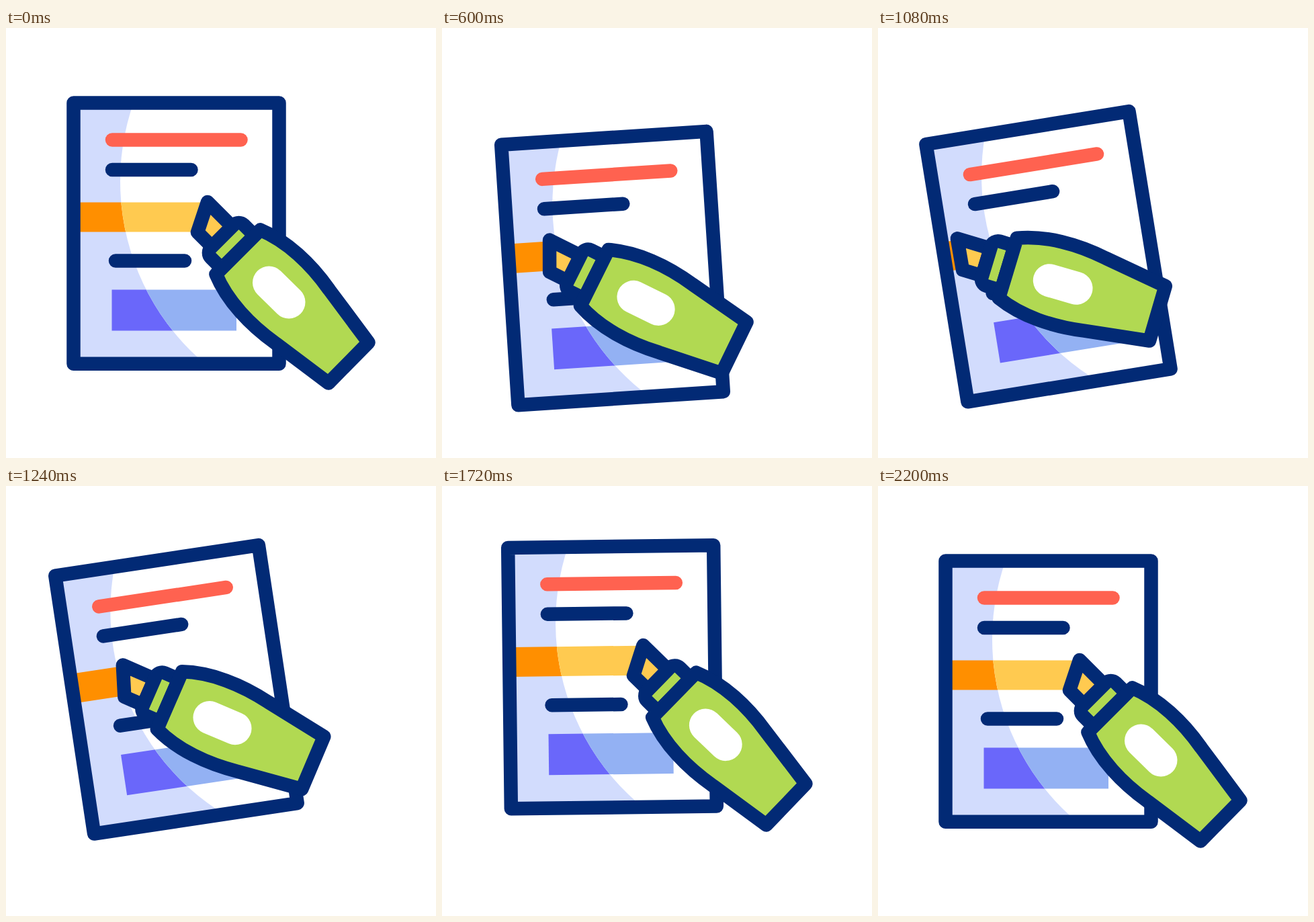
Recreate the animation shown at these times as an HTML page. Size 640 by 640 pixels, loop 2400 ms.

```html
<!DOCTYPE html>
<html lang="en">
<head>
<meta charset="utf-8">
<title>Highlighter</title>
<style>
  html, body { margin: 0; width: 100%; height: 100%; overflow: hidden; background: #fff; }
  svg { display: block; width: 100%; height: 100%; }
  .ink { stroke: #022a75; stroke-width: 20.5; stroke-linecap: round; stroke-linejoin: round; }
</style>
</head>
<body>
<svg viewBox="0 0 640 640">
  <clipPath id="lit"><circle cx="526" cy="228" r="356"/></clipPath>
  <g id="page">
    <path fill="#d2dcfd" d="M100.5 111.5h306v388.3h-306z"/>
    <rect class="mark" x="105" y="259.5" height="44" fill="#ff8f00"/>
    <path fill="#6a67fa" d="M157.5 389.5H343v61H157.5z"/>
    <g clip-path="url(#lit)">
      <path fill="#fff" d="M100.5 111.5h306v388.3h-306z"/>
      <rect class="mark" x="105" y="259.5" height="44" fill="#ffca50"/>
      <path fill="#93b1f3" d="M157.5 389.5H343v61H157.5z"/>
    </g>
    <path class="ink" style="stroke:#ff6250" d="M158 166.5H349.5"/>
    <path class="ink" fill="none" d="M158 211H275.500M163 346.500H266M100.500 111.500h306v388.300h-306z"/>
    <g id="pen" class="ink">
      <path fill="#ffca50" d="M300 259L336.500 295.500L306.500 325.500L285 304Z"/>
      <path fill="#b1d952" d="M339 293A10.600 10.600 0 0 1 354 293L370 309L321 358L305 342A10.600 10.600 0 0 1 305 327Z"/>
      <path fill="#b1d952" d="M378.500 300.500C418 317 454 351 481 389.500L539.500 468L480 528.500L401.500 469.500C363 442 329 406 312.500 366.500Z"/>
      <path style="stroke:#fff;stroke-width:49" d="M391.500 379L421 408"/>
    </g>
  </g>
</svg>
<script>
const LOOP = 2400, STEP = 40;
const page = document.getElementById('page');
const pen = document.getElementById('pen');
const marks = document.querySelectorAll('.mark');

// Cubic Bezier easing with handles (a, 0) and (b, 1)
function ease(x, a, b) {
  let lo = 0, hi = 1;
  for (let i = 0; i < 24; i++) {
    const s = (lo + hi) / 2, r = 1 - s;
    if (3 * a * s * r * r + 3 * b * s * s * r + s * s * s < x) lo = s; else hi = s;
  }
  return lo * lo * (3 - 2 * lo);
}

// Keys: [time, value, a, b], the handles shape the move that ends at the key
function track(keys, t) {
  const i = keys.findIndex(k => t < k[0]);
  if (i < 0) return keys[keys.length - 1][1];
  if (i === 0) return keys[0][1];
  const [t0, v0] = keys[i - 1], [t1, v1, a = 1 / 3, b = 2 / 3] = keys[i];
  return v0 + (v1 - v0) * ease((t - t0) / (t1 - t0), a, b);
}

const drop = [[200, 0], [867, 66, .263, .465], [1533, -25, .333, .4], [2200, 0, .543, .308]];
const tilt = [[200, 0], [1120, -9.25], [1840, 0]];
const slide = [[200, 0], [800, 1], [1000, 1], [1600, 0]];

function draw(now) {
  const t = Math.floor(now % LOOP / STEP) * STEP;
  const s = track(slide, t);
  page.setAttribute('transform', `translate(0 ${track(drop, t)}) rotate(${track(tilt, t)} 253.5 305.75)`);
  pen.setAttribute('transform', `translate(${-185 * s} ${-1.7 * s}) rotate(${-20 * s} 300 259)`);
  marks.forEach(m => m.setAttribute('width', 190 - 185 * s));
}

const start = performance.now();
function tick() {
  draw(performance.now() - start);
  requestAnimationFrame(tick);
}
tick();
</script>
</body>
</html>
```
